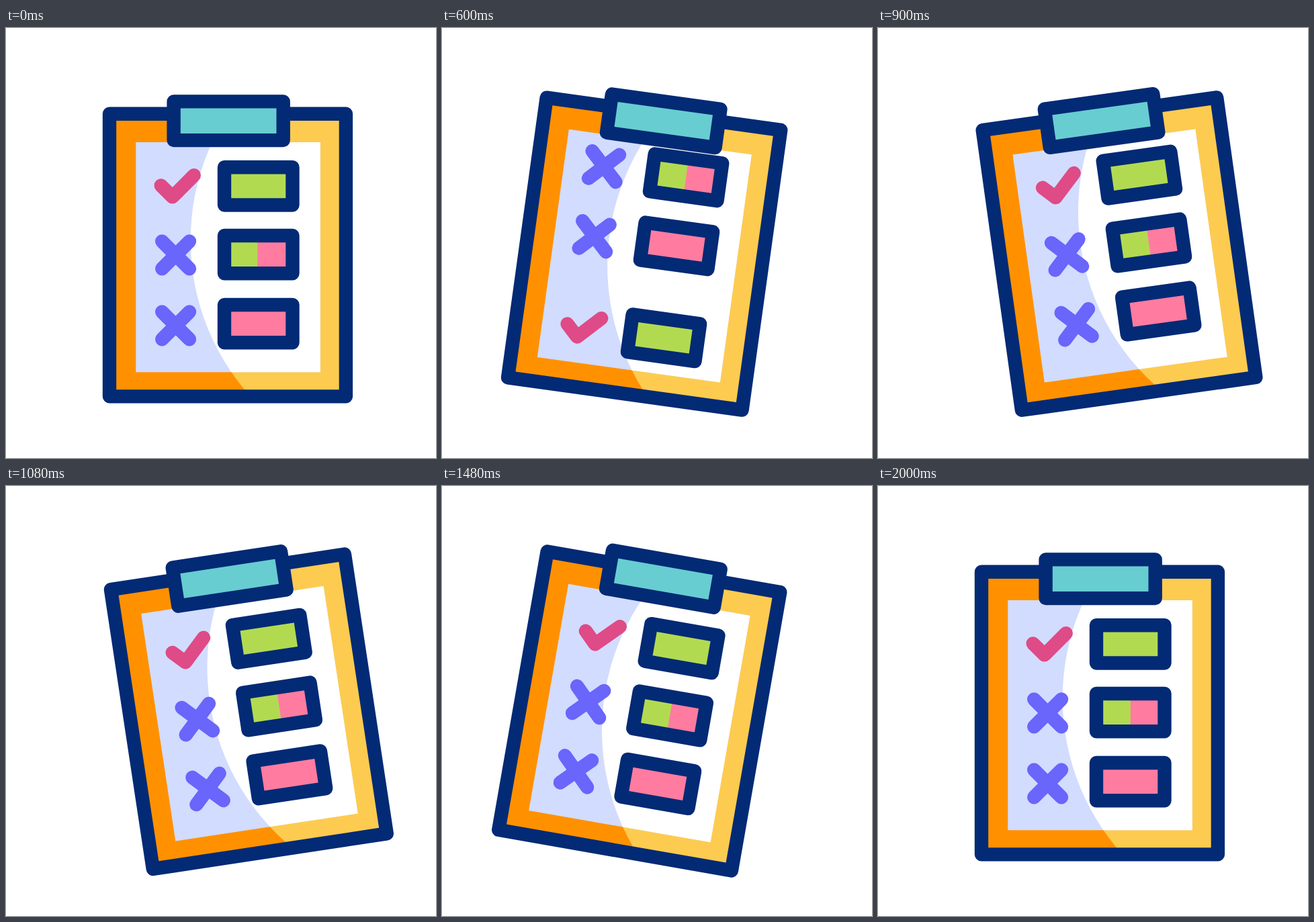
Recreate the animation shown at these times as an HTML page. Size 640 by 640 pixels, loop 2020 ms.

```html
<!DOCTYPE html>
<html lang="en">
<head>
<meta charset="utf-8">
<title>Clipboard checklist</title>
<style>
  html, body { margin: 0; width: 100%; height: 100%; overflow: hidden; background: #fff; }
  svg { display: block; width: 100%; height: 100%; }
  .line { fill: none; stroke-width: 20.4; stroke-linecap: round; stroke-linejoin: round; }
  .navy { stroke: #032a75; }
  .check { stroke: #de4b86; }
  .cross { stroke: #6a65fb; }
</style>
</head>
<body>
<svg viewBox="0 0 640 640">
  <defs>
    <clipPath id="paper"><path d="M193.3 170H467.8V512.3H193.3Z"/></clipPath>
    <clipPath id="light"><circle cx="622.3" cy="316" r="347.6"/></clipPath>
    <path id="cross" class="line cross" d="M232.2 317.5L273 358.3M273 317.5L232.2 358.3"/>
    <path id="frame" class="line navy" d="M325 207.2H426.5V263.5H325Z"/>
    <path id="fill" d="M330 212H421V259H330Z"/>
    <g id="rows">
      <path class="line check" d="M230.7 234.4L247.8 251.4L279.8 219.3"/>
      <use href="#cross"/>
      <use href="#cross" y="105"/>
      <use href="#fill" fill="#b2da51"/>
      <use href="#fill" y="101.8" fill="#ff7ca0"/>
      <use href="#fill" y="204.8" fill="#ff7ca0"/>
    </g>
    <g id="frames">
      <use href="#frame"/>
      <use href="#frame" y="101.8"/>
      <use href="#frame" y="204.8"/>
    </g>
  </defs>
  <g id="board">
    <path fill="#ff9100" d="M154 128H506V548H154Z"/>
    <path fill="#fdcb50" d="M154 128H506V548H154Z" clip-path="url(#light)"/>
    <g clip-path="url(#paper)">
      <path fill="#d2dcfe" d="M190 165H470V515H190Z"/>
      <circle fill="#fff" cx="622.3" cy="316" r="347.6"/>
      <g id="list">
        <use href="#rows"/>
        <path fill="#b2da51" d="M330 314H374.2V360H330Z"/>
        <use href="#frames"/>
        <g transform="translate(0 -343)">
          <use href="#rows"/>
          <path fill="#b2da51" d="M330 314H375.8V360H330Z"/>
          <use href="#frames"/>
        </g>
      </g>
    </g>
    <path class="line navy" d="M154 127.8H505.9V548.4H154Z"/>
    <path class="line navy" style="fill:#67cdd1" d="M249.6 109.4H412.7V167.1H249.6Z"/>
  </g>
</svg>
<script>
  const LOOP = 2020, SWING = 500, ROW_SPAN = 343;
  const angles = [0, 10, -10, 10, 0];
  const board = document.getElementById('board');
  const list = document.getElementById('list');

  const ease = x => {
    x = Math.min(1, Math.max(0, x));
    return x * x * (3 - 2 * x);
  };

  function draw(t) {
    const i = Math.min(3, Math.floor(t / SWING));
    const angle = angles[i] + (angles[i + 1] - angles[i]) * ease(t / SWING - i);
    board.setAttribute('transform', `rotate(${angle} 330 128)`);
    list.setAttribute('transform', `translate(0 ${ROW_SPAN * ease(t / 1000)})`);
  }

  function tick() {
    draw(performance.now() % LOOP);
    requestAnimationFrame(tick);
  }
  tick();
</script>
</body>
</html>
```
